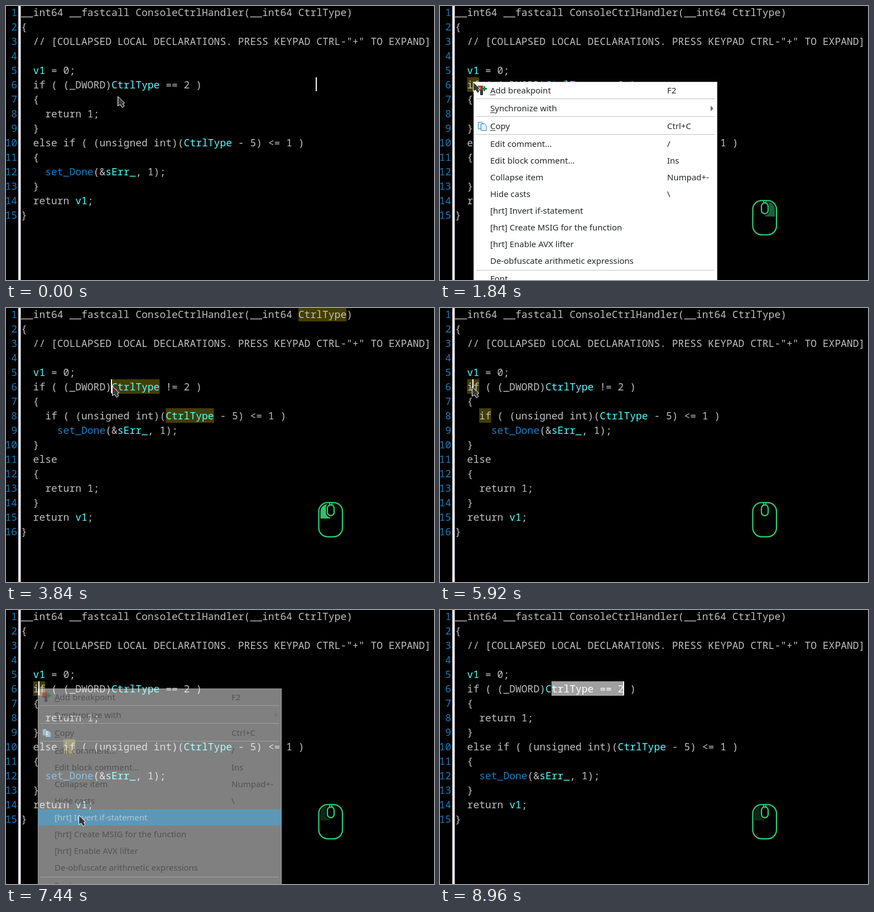
Write an HTML page with a canvas that moves like this. It is 767 by 492 pixels and loops after 9.04 s.

```html
<!DOCTYPE html>
<html lang="en">
<head>
<meta charset="utf-8">
<title>Invert if-statement</title>
<style>
  html, body { margin: 0; width: 100%; height: 100%; overflow: hidden; background: #000; }
  canvas { display: block; }
</style>
</head>
<body>
<canvas width="767" height="492"></canvas>
<script>
const ctx = document.querySelector('canvas').getContext('2d');
const LOOP = 9040, STEP = 80;
const CHAR = 10.8, LINE = 26, LEFT = 27, CARET_ROW = 5;
const CODE_FONT = '18px "Noto Sans Mono", monospace';
const MENU_FONT = '15px "Noto Sans", sans-serif';
const GREEN = '#2ecc71';

const head = `__int64 __fastcall ConsoleCtrlHandler(__int64 CtrlType)
{
  // [COLLAPSED LOCAL DECLARATIONS. PRESS KEYPAD CTRL-"+" TO EXPAND]

  v1 = 0;
`;
const elseIfCode = (head + `  if ( (_DWORD)CtrlType == 2 )
  {
    return 1;
  }
  else if ( (unsigned int)(CtrlType - 5) <= 1 )
  {
    set_Done(&sErr_, 1);
  }
  return v1;
}`).split('\n');
const nestedCode = (head + `  if ( (_DWORD)CtrlType != 2 )
  {
    if ( (unsigned int)(CtrlType - 5) <= 1 )
      set_Done(&sErr_, 1);
  }
  else
  {
    return 1;
  }
  return v1;
}`).split('\n');

// label, shortcut, centre y inside the menu
const menuItems = [
  ['Add breakpoint', 'F2', 16], ['Synchronize with', '', 48], ['Copy', 'Ctrl+C', 80],
  ['Edit comment...', '/', 112], ['Edit block comment...', 'Ins', 142],
  ['Collapse item', 'Numpad+-', 172], ['Hide casts', '\\', 202],
  ['[hrt] Invert if-statement', '', 232], ['[hrt] Create MSIG for the function', '', 262],
  ['[hrt] Enable AVX lifter', '', 292], ['De-obfuscate arithmetic expressions', '', 322],
  ['Font...', '', 354]
];
const menus = [
  { x: 60, y: 136, open: 1680, close: 3040 },
  { x: 57, y: 141, open: 6160, close: 7360 }
];
// time, x, y of the pointer
const path = [
  [0, 200, 162], [640, 59, 136], [1880, 59, 136], [2560, 123, 368], [3060, 123, 368],
  [3560, 190, 140], [3880, 190, 140], [4440, 329, 143], [4520, 329, 143], [4960, 57, 141],
  [6360, 57, 141], [7040, 128, 350], [7200, 130, 368], [7440, 130, 368], [7920, 201, 143],
  [8240, 201, 143], [8640, 329, 150], [8800, 329, 150], [8960, 909, 588]
];
// press, release, right button
const clicks = [
  [800, 1160], [1720, 2000, true], [2700, 3040], [3600, 4500],
  [5040, 5380], [6200, 6450, true], [7390, 7640], [7940, 8760]
];
const drags = [
  { start: 3880, end: 5120, from: 15 },
  { start: 8320, end: LOOP, from: 16 }
];
const caretOff = [[420, 800], [1420, 3040], [5420, 5910]];

const clamp = v => Math.max(0, Math.min(1, v));
const within = (t, a, b) => t >= a && t < b;
const rowTop = row => row * LINE - 2;
const colX = col => LEFT + col * CHAR;

function rect(color, x, y, w, h) {
  ctx.fillStyle = color;
  ctx.fillRect(x, y, w, h);
}

function text(str, x, y, color) {
  ctx.fillStyle = color;
  ctx.fillText(str, x, y);
}

function pill(x, y, w, h, r) {
  ctx.beginPath();
  ctx.roundRect(x, y, w, h, r);
}

function pointerAt(t) {
  const i = path.findIndex(p => p[0] > t);
  if (i < 0) return path.at(-1).slice(1);
  const [t0, x0, y0] = path[i - 1], [t1, x1, y1] = path[i];
  const u = (t - t0) / (t1 - t0), e = u * u * (3 - 2 * u);
  return [x0 + (x1 - x0) * e, y0 + (y1 - y0) * e];
}

function highlightedWord(t) {
  if (within(t, 800, 3600) || within(t, 5120, 7940)) return /\bif\b/g;
  if (within(t, 3600, 3880) || within(t, 7940, 8320)) return /\bCtrlType\b/g;
}

function drawCode(lines, word) {
  ctx.font = CODE_FONT;
  lines.forEach((line, row) => {
    const base = row * LINE + 18;
    ctx.textAlign = 'right';
    text(row + 1, 20, base, '#1b7ab8');
    ctx.textAlign = 'left';
    if (word) for (const m of line.matchAll(word))
      rect('#433e00', colX(m.index), rowTop(row), m[0].length * CHAR, LINE);
    let col = 0;
    for (const part of line.split(/(\bv1\b|\bCtrlType\b|\bsErr_|set_Done)/)) {
      const color = part === 'set_Done' ? '#1a7fc4'
        : row && /^(v1|CtrlType|sErr_)$/.test(part) ? '#55ffff' : '#c0c0c0';
      text(part, colX(col), base, color);
      col += part.length;
    }
  });
  rect('#f0edf5', 22, 0, 4.5, 492);
  for (let y = 351; y < 366; y += 3) rect('#b8b8c0', 24, y, 1, 1);
}

function drawCaret(t, line, pointerX) {
  let col = t < 800 ? 49 : within(t, 3600, 5120) ? 15 : t >= 7940 ? 16 : 3;
  const drag = drags.find(d => within(t, d.start, d.end));
  const top = rowTop(CARET_ROW);
  if (drag) {
    const held = t < drag.start + 600;
    col = held ? Math.min(28, Math.round((pointerX - LEFT) / CHAR)) : 28;
    col = Math.max(drag.from, col);
    rect('#a0a0a0', colX(drag.from), top, (col - drag.from) * CHAR, LINE);
    text(line.slice(drag.from, col), colX(drag.from), CARET_ROW * LINE + 18, '#fff');
  }
  if (!caretOff.some(([a, b]) => within(t, a, b)))
    rect('#fff', Math.round(colX(col)) - 1, top, 2, 25);
}

function drawMenuIcons() {
  rect('#26344d', 12, 14, 5, 10);
  rect('#8c2b20', 8, 7, 9, 9);
  rect('#d8432f', 10, 8, 4, 6);
  rect('#16803c', 15, 11, 9, 3);
  rect('#16803c', 18, 8, 3, 9);
  ctx.strokeStyle = '#2d7fb0';
  ctx.lineWidth = 1;
  for (const [x, y] of [[8.5, 72.5], [13.5, 75.5]]) {
    ctx.beginPath();
    ctx.moveTo(x, y);
    ctx.lineTo(x + 6, y);
    ctx.lineTo(x + 10, y + 4);
    ctx.lineTo(x + 10, y + 12);
    ctx.lineTo(x, y + 12);
    ctx.closePath();
    ctx.fillStyle = '#e6f3fb';
    ctx.fill();
    ctx.stroke();
  }
}

function drawMenu(menu, t) {
  const alpha = Math.min(clamp((t - menu.open + 80) / 160), clamp(1 - (t - menu.close) / 160));
  if (t < menu.open || !alpha) return;
  const [px, py] = pointerAt(Math.min(t, menu.close));
  ctx.save();
  ctx.globalAlpha = alpha;
  ctx.translate(menu.x, menu.y);
  rect('#fff', 0, 0, 437, 400);
  ctx.strokeStyle = '#c4c4c4';
  ctx.lineWidth = 1;
  ctx.strokeRect(.5, .5, 436, 400);
  for (const y of [30, 62, 94, 338]) rect('#c2c2c2', 5, y, 427, 1);
  ctx.font = MENU_FONT;
  menuItems.forEach(([label, key, y], i) => {
    const hover = px > menu.x + 2 && Math.abs(py - menu.y - y) < 15;
    const color = hover ? '#fcfcfc' : '#232629';
    if (hover) rect('#3daee9', 0, y - 15, 437, 29);
    text(label, 30, y + 5, color);
    text(key, 347, y + 5, color);
    if (i < 3) rect(color, 30, y + 7, ctx.measureText(label[0]).width, 1);
  });
  ctx.fillStyle = '#6a6d70';
  ctx.beginPath();
  ctx.moveTo(425, 43);
  ctx.lineTo(430, 48);
  ctx.lineTo(425, 53);
  ctx.fill();
  drawMenuIcons();
  ctx.restore();
}

function drawPointer(x, y) {
  ctx.save();
  ctx.translate(Math.round(x) + .5, Math.round(y) + .5);
  ctx.fillStyle = '#3a3a3a';
  ctx.strokeStyle = '#fff';
  ctx.lineWidth = 1;
  ctx.beginPath();
  for (const p of [[0, 0], [0, 17], [4, 14.5], [8, 20], [11.5, 17], [9, 13], [12, 11.5]]) ctx.lineTo(...p);
  ctx.closePath();
  ctx.fill();
  ctx.stroke();
  ctx.restore();
}

function drawMouse(t) {
  if (t < 800) return;
  ctx.fillStyle = GREEN;
  for (const [press, release, right] of clicks) {
    ctx.globalAlpha = Math.min(clamp((t - press) / 250), clamp(1 - (t - release) / 250));
    pill(right ? 582.5 : 563.5, 352, 17.5, 26, right ? [0, 14, 0, 0] : [14, 0, 0, 0]);
    ctx.fill();
  }
  ctx.globalAlpha = 1;
  pill(573.5, 350, 16.5, 26, 8);
  ctx.fillStyle = '#000';
  ctx.fill();
  ctx.strokeStyle = GREEN;
  ctx.lineWidth = 2.3;
  pill(560.5, 349.3, 42.5, 61.5, 16);
  ctx.stroke();
  pill(576, 353.5, 12, 19.5, 6);
  ctx.stroke();
  rect(GREEN, 579, 349, 1.8, 5);
  rect(GREEN, 583.2, 349, 1.8, 5);
}

function frame(now) {
  const t = Math.floor(now % LOOP / STEP) * STEP;
  const lines = within(t, 3040, 7360) ? nestedCode : elseIfCode;
  const [x, y] = pointerAt(t);
  rect('#000', 0, 0, 767, 492);
  drawCode(lines, highlightedWord(t));
  drawCaret(t, lines[CARET_ROW], x);
  for (const menu of menus) drawMenu(menu, t);
  drawPointer(x, y);
  drawMouse(t);
  requestAnimationFrame(frame);
}
requestAnimationFrame(frame);
</script>
</body>
</html>
```
